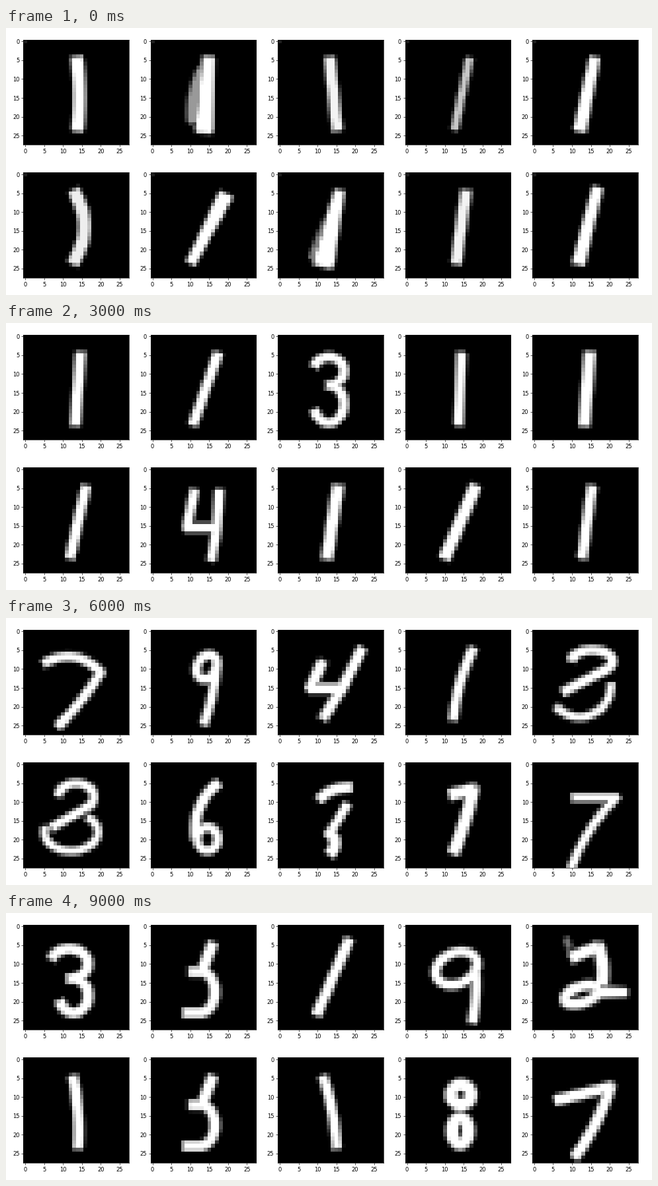
Recreate the animation shown at these times as a matplotlib script. Size 977 by 405 pixels, loop 10 s.

```python
import numpy as np
import matplotlib.pyplot as plt
from matplotlib.animation import FuncAnimation

W, H, DPI = 977, 405, 100
N = 28
SOFT = 1.2                       # width of the grey rim, in cells
GY, GX = np.mgrid[0:N, 0:N]
T = np.linspace(0, 1, 60)


# --- pen ---------------------------------------------------------------

def ink(x, y, r=1.4, end=None, v=1.0):
    """Paint a path on the grid; the pen radius runs from r to end."""
    rad = np.linspace(r, end or r, len(x))
    dx, dy = GX[..., None] - x, GY[..., None] - y
    gap = np.hypot(dx, dy) - rad
    near, edge = gap.argmin(-1), gap.min(-1)
    closed = np.hypot(x[0] - x[-1], y[0] - y[-1]) < 0.01
    if not closed:               # flatten the caps
        for i, j in ((0, 1), (len(x) - 1, len(x) - 2)):
            ux, uy = x[i] - x[j], y[i] - y[j]
            along = (dx[..., i] * ux + dy[..., i] * uy) / np.hypot(ux, uy)
            edge = np.where(near == i, np.maximum(edge, along - 0.6 * rad[i]), edge)
    return v * np.clip(0.5 - edge / SOFT, 0, 1)


def mix(*parts):
    return np.maximum.reduce(parts)


def line(x0, y0, x1, y1, bow=0, **pen):
    """Straight stroke, bulging sideways by bow."""
    w, h = x1 - x0, y1 - y0
    bulge = 4 * bow * T * (1 - T) / np.hypot(w, h)
    return ink(x0 + w * T + h * bulge, y0 + h * T - w * bulge, **pen)


def arc(cx, cy, rx, ry, a=0, b=360, lean=0, **pen):
    """Part of a sheared ellipse, clockwise from a to b degrees."""
    t = np.radians(a + (b - a) * T)
    dy = ry * np.sin(t)
    return ink(cx + rx * np.cos(t) - lean * dy, cy + dy, **pen)


def dot(x, y, v):
    return v * ((GX == x) & (GY == y))


# --- digits ------------------------------------------------------------

def one(top, foot, r=1.5, end=None, bow=0, y0=5, y1=23, v=1):
    return line(top, y0, foot, y1, bow, r=r, end=end, v=v)


def hook(cx, cy, rx, ry, foot, y1, r=1.3):
    x, y = cx + rx * np.cos(0.8), cy + ry * np.sin(0.8)
    return mix(arc(cx, cy, rx, ry, -170, 46, r=r), line(x, y, foot, y1, r=r))


def three(x0, x1, mid, x2, x3, y0=5.5, y1=23, r=1.25):
    upper = arc((x0 + x1) / 2, (y0 + mid) / 2, (x1 - x0) / 2, (mid - y0) / 2,
                -155, 90, r=r)
    lower = arc((x2 + x3) / 2, (mid + y1) / 2, (x3 - x2) / 2, (y1 - mid) / 2,
                -90, 155, r=r)
    return mix(upper, lower)


def four(top, left, right, corner, stem, foot, mid=15.5, y0=6, drop=0,
         y1=23.7, r=1.25):
    return mix(line(top, y0 + drop, left, mid, r=r),
               line(left, mid, max(corner, stem), mid, r=r),
               line(right, y0, corner, mid, r=r),
               line(stem, mid, foot, y1, r=r))


def seven(x0, y0, x1, y1, foot, end, arch=0, bow=0, r=1.25):
    return mix(line(x0, y0, x1, y1, arch, r=r), line(x1, y1, foot, end, bow, r=r))


def nine(cx, cy, rx, ry, foot, lean=0, y1=24.3, r=1.25):
    return mix(arc(cx, cy, rx, ry, lean=lean, r=r),
               line(cx + 0.95 * rx, cy, foot, y1, bow=0.5, r=r))


def hooked_three():
    return mix(one(15.7, 13.3, y1=11.5), line(10.3, 12.1, 14, 12.1),
               arc(12.8, 17.5, 3.6, 5.4, -80, 80), line(8.7, 23, 13, 23))


# --- scenes, ten digits each -------------------------------------------

def random_ones(seed, changes={}):
    """Slanted ones, some of them swapped for other digits."""
    rng = np.random.default_rng(seed)
    row = []
    for _ in range(10):
        lean = rng.uniform(-0.5, 4)
        row.append(one(14 + lean, 14 - lean, rng.uniform(1.3, 1.8)))
    for k, digit in changes.items():
        row[k] = digit
    return row


def slim_ones():
    return [
        one(13.8, 14, 1.7, bow=.5),
        mix(one(14.8, 13.7, 1.7, 2.5), line(13, 8, 11.3, 20.5, -.8, r=1.5, end=2.2, v=.6)),
        one(13.3, 15.2, v=.95),
        one(16.4, 12.6, 1.1, v=.78),
        one(15.9, 12.2, 1.5, 1.8),
        one(13.2, 13, 1.7, bow=2.6, v=.93),
        one(19, 10.4, 2, 1.4, y0=6.2),
        mix(one(15.7, 11.8, 1.5, 2.8), line(12.5, 13, 9, 22, v=.5)),
        one(15.5, 13, v=.95),
        one(16.6, 11.9, 1.5, 1.8, y0=4.2)]


def first_loops():
    return [
        one(14.3, 13.1, 1.2, v=.95),
        mix(one(16.8, 14.2, 1.9, y0=4.3, y1=9.3),
            line(13.5, 10.5, 10.9, 20.5, r=1.3, end=2.1),
            line(10.9, 20.5, 19.6, 20.2, r=1.7, end=1.3)),
        mix(arc(14.4, 9.5, 4.6, 3.6, lean=.25), line(13.5, 14.5, 12, 22.6, .5, r=2.2)),
        one(16.4, 13.2, bow=-.9),
        one(19.6, 9, 1.7, y1=24),
        one(21.3, 8.2, 1.75, y0=5.6, y1=24),
        four(11, 8.8, 17.5, 17.5, 17.5, 15.9, mid=14.2, y0=8.8, drop=-2.6, y1=24.4),
        one(17.8, 9.6, 1.3, y0=5.5, y1=23.4),
        one(12.8, 14.9, 1.3, 1.8, bow=.6),
        mix(one(14.4, 14.4, 1.3, bow=.6, y0=4), line(8.9, 8.5, 11, 7.5, r=.9, v=.28))]


def open_shapes():
    upright = one(14.9, 13.4, 1.6, 1.8)
    return [
        nine(13.4, 11.4, 4.8, 4.9, 16, lean=.1),
        mix(one(15.4, 13.7, bow=-.3, y1=24), line(9.5, 6, 9.5, 10.5, v=.1)),
        mix(line(19, 6, 11.5, 10, -1, r=1.3), line(12, 11, 17.3, 12.8, -1, r=1.3),
            line(13.5, 14.5, 9.5, 20.5, r=1, v=.3), arc(12.4, 20, 3.1, 2.9, 180, 0, r=1.1)),
        one(15.6, 12, 1.7),
        upright,
        one(15.8, 11.9, 1.7, 1.85),
        one(16.8, 11, 1.75),
        three(6, 17.4, 13.5, 6.3, 20.6, y0=6.5),
        one(15, 13.9, 1.35, bow=-.3, y1=24),
        upright]


def sweeping():
    return [
        seven(5.3, 8.4, 20, 11, 9, 25, arch=2.8, bow=.5),
        nine(14.3, 9.5, 2.6, 3.2, 13.7, lean=.2),
        four(11.2, 8, 21.6, 16.5, 16.5, 11.7, mid=15.2, y0=5, drop=3.5, y1=22.8, r=1.4),
        one(17.3, 12.2, 1.3, bow=-.8),
        mix(hook(15.3, 8, 5.4, 3, 8, 16), arc(12, 14.3, 8.3, 8.5, 0, 135, r=1.1)),
        mix(hook(13.5, 8.6, 4.7, 3.6, 7.4, 16.6, r=1.2),
            arc(12.2, 18, 7.1, 5, -48, 190, r=1.1)),
        mix(line(17, 5.3, 11.4, 19.3, -2), arc(14.5, 19.8, 2.7, 3.1, r=1.2)),
        mix(line(10.8, 9, 18.5, 6.1, .8), line(17.7, 11, 13.2, 18.5, r=1.2),
            line(13, 18, 13.7, 23.4, 1.3, r=1.6)),
        seven(11.9, 8, 17.4, 6.7, 12.4, 23, bow=.4, r=1.65),
        seven(10.5, 8.8, 21.8, 8.8, 10, 27, bow=-1.2, r=1.15)]


def sharp_fours():
    row = [
        mix(line(7, 6, 9.3, 6, r=.65, v=.55), one(15.6, 13, .85, bow=.6, y1=24)),
        four(13.6, 6.9, 19.7, 18, 14.4, 13.3, mid=15.8),
        nine(12.2, 10, 2, 2.9, 17, r=1.4),
        mix(hook(14, 9.8, 4.7, 3.7, 10.5, 22), line(10.2, 23.8, 16.2, 23.8, r=1.7)),
        one(15.6, 12.4),
        four(13.3, 7.2, 18.4, 19, 14.4, 13.8, mid=16.4, r=1.15),
        mix(one(12.8, 13.3, 1.75, bow=.5), line(13, 21.8, 17.6, 21.8, r=1.6)),
        one(17.6, 11),
        mix(seven(6, 12.5, 19, 9, 9, 23, arch=1.8, bow=4, r=1.75), one(6, 6, 1.7, y0=11, y1=14.2)),
        one(14, 14, 1.35, y0=5.6, y1=23.8)]
    return [mix(d, dot(27, 27, .12)) if k in (0, 1, 5) else d for k, d in enumerate(row)]


def bold_shapes():
    return [
        three(10.5, 17, 14, 9.5, 15.2, y1=22.7, r=1.7),
        seven(7.3, 13.6, 20.6, 7.4, 10.8, 27, arch=1.4, r=1.15),
        mix(line(9.2, 5.6, 8.3, 10.2, r=1.5), line(9.5, 4.7, 15, 4.8, r=1.1, end=.6),
            arc(17.3, 14, 4, 6, lean=.5, r=2.2), line(19, 9, 18, 14, r=2.6)),
        mix(arc(14.8, 8.8, 1.9, 3.3, r=1.3), arc(14.8, 17.8, 3, 4.5, 265, 85, r=1.5)),
        one(17.6, 11.5, 1.35, bow=-.5, y0=4.4),
        nine(13.4, 10.8, 3.6, 3.9, 14.4, lean=.3),
        mix(line(12, 3.4, 9, 15.5, -.8, r=1.8), arc(14.8, 14.8, 6, 4.4, 180, 20, r=1.9),
            arc(18.7, 15.9, 2.1, 2.8, r=1.6)),
        three(9, 17, 13.2, 4, 19.6, y0=5.3, y1=22.5, r=1.15),
        mix(seven(6.8, 8.2, 18.2, 8, 14.1, 24.6, bow=-1.2), line(6.8, 8.2, 13, 8.5, r=1.7)),
        four(9.9, 11.5, 18.7, 17.4, 17.4, 17.2, mid=15, y0=9.3, drop=-3.7, y1=23)]


def late_mix():
    return [
        three(6.8, 16.6, 14, 9, 16.7, y0=6, r=1.4),
        hooked_three(),
        one(18.2, 10, 1.4, y0=4),
        nine(13, 11.2, 5.3, 4.4, 17.3, lean=.3, y1=25, r=1.3),
        mix(line(8.5, 3.6, 9.3, 5.6, r=.9, v=.45), line(10.3, 8.2, 16.5, 5.6, r=1.6),
            line(17, 5.6, 18, 15, .6, r=1.65), arc(12.5, 18.2, 4, 2.5, lean=.8),
            line(17, 17.5, 24, 17.6, r=1.6, end=1.2)),
        one(12.7, 14.1, 1.4, bow=.6),
        hooked_three(),
        one(11.6, 15.1, 1.35, bow=.6),
        mix(arc(14.2, 9.4, 2.6, 2.6, r=1.7), arc(14, 19, 2.1, 3.4, r=1.75)),
        seven(6.2, 10.8, 20.2, 7.3, 11, 25.6, bow=.8, r=1.45)]


def with_corner(row):
    return [mix(d, dot(0, 0, .12)) for d in row]


SCENES = [
    with_corner(slim_ones()),
    with_corner(random_ones(1)),
    first_loops(),
    random_ones(2, {2: three(9, 17, 13, 9, 17), 6: four(11, 9, 17.6, 17, 17, 15.6)}),
    open_shapes(),
    random_ones(3, {0: seven(8, 8, 18, 7.5, 12, 24), 2: four(11, 8, 18.5, 16.5, 16, 14),
                    4: three(9, 18, 13, 8, 18.5), 6: nine(14, 9.5, 3, 3.3, 14.6)}),
    sweeping(),
    sharp_fours(),
    bold_shapes(),
    late_mix()]

# --- figure ------------------------------------------------------------

SIDE, STEP_X, STEP_Y = 159.7, 192.45, 201.8
LEFT, TOP = 26.3, 17.6
K = 60.1 / DPI                   # ticks and type are set at 60.1 px per inch

plt.rcParams.update({"font.family": "DejaVu Sans", "font.size": 10 * K,
                     "axes.linewidth": .8 * K})
for axis in ("xtick", "ytick"):
    plt.rcParams.update({f"{axis}.major.size": 3.5 * K, f"{axis}.major.pad": 3.5 * K,
                         f"{axis}.major.width": .8 * K})

fig = plt.figure(figsize=(W / DPI, H / DPI), dpi=DPI, facecolor="white")
panels = []
for k in range(10):
    x = LEFT + STEP_X * (k % 5)
    y = H - TOP - STEP_Y * (k // 5) - SIDE
    ax = fig.add_axes([x / W, y / H, SIDE / W, SIDE / H])
    panels.append(ax.imshow(SCENES[0][k], cmap="gray", vmin=0, vmax=1,
                            aspect="auto", interpolation="nearest"))
    ax.set_xticks(range(0, N, 5))
    ax.set_yticks(range(0, N, 5))


def draw(i):
    for panel, digit in zip(panels, SCENES[i]):
        panel.set_data(digit)
    return panels


anim = FuncAnimation(fig, draw, frames=len(SCENES), interval=1000,
                     repeat=True, repeat_delay=0, blit=False)
plt.show()
```
